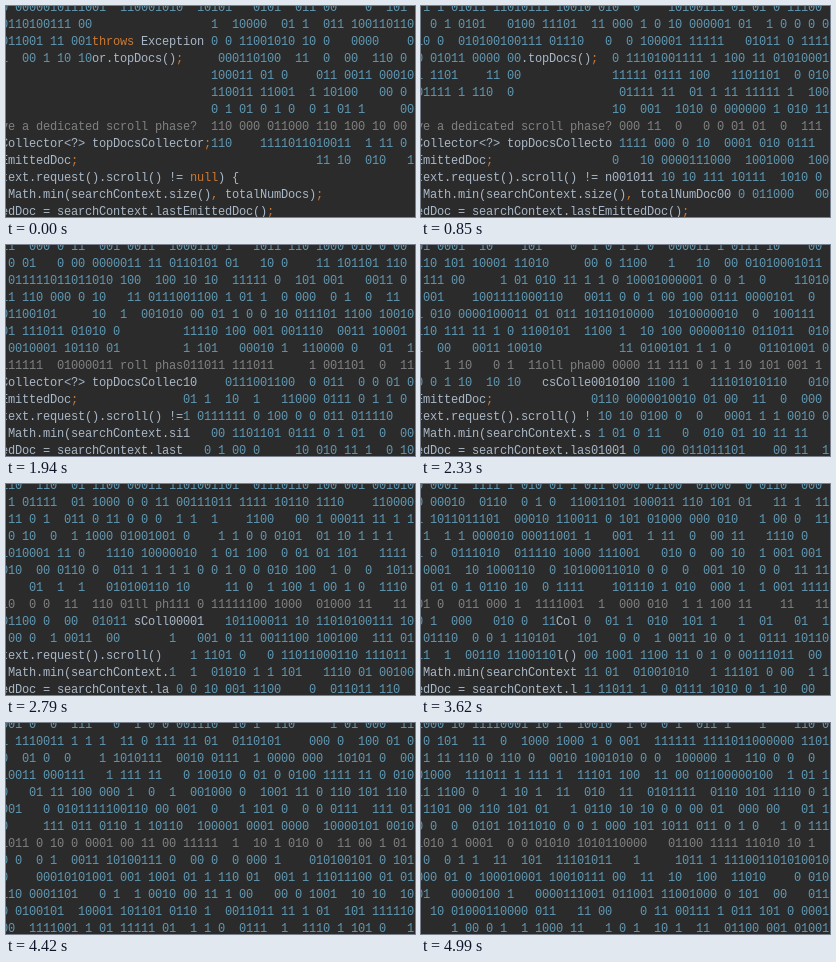
An HTML page for the animation above (5090 ms loop, 409 by 211 pixels).

```html
<!DOCTYPE html>
<html lang="en">
<head>
<meta charset="utf-8">
<title>Code turning into binary</title>
<style>
  html, body { margin: 0; width: 100%; height: 100%; overflow: hidden; background: #2b2b2b; }
  svg { display: block; width: 409px; height: 211px; }
  text {
    font: 12px "Liberation Mono", "DejaVu Sans Mono", monospace;
    white-space: pre;
    fill: #a9b7c6;
  }
  .number { fill: #6098b2; }
  .keyword { fill: #cc7832; }
  .comment { fill: #808080; }
</style>
</head>
<body>
<svg id="editor" viewBox="0 0 409 211"></svg>
<script>
const LOOP = 5090, COLS = 59, CELL = 7, LINE = 17, LEFT = -5, BASE = 5;
const COMMENT_ROW = 7;
const code = [
  '',
  '',
  ' '.repeat(13) + 'throws Exception',
  ' '.repeat(13) + 'or.topDocs();',
  '',
  '',
  '',
  've a dedicated scroll phase?',
  'Collector<?> topDocsCollector;',
  'EmittedDoc;',
  'text.request().scroll() != null) {',
  ' Math.min(searchContext.size(), totalNumDocs);',
  'edDoc = searchContext.lastEmittedDoc();'
].map(line => line.padEnd(COLS));

// moments when the digits are reshuffled
const shuffles = [0, 150, 280, 420, 550, 850, 970, 1240, 1390, 1670, 1820, 1940,
  2090, 2210, 2330, 2480, 2790, 2910, 3190, 3340, 3620, 3770, 3890, 4010,
  4290, 4420, 4690, 4840, 4990];
// moments when the digits spread one row and column further
const spreads = [150, 850, 1240, 1820, 2330, 2790, 3340, 3770, 4290];

const NS = 'http://www.w3.org/2000/svg';
const editor = document.getElementById('editor');
const xs = Array.from({ length: COLS }, (_, c) => LEFT + c * CELL).join(' ');
const rows = code.map((_, r) => {
  const el = document.createElementNS(NS, 'text');
  el.setAttribute('x', xs);
  el.setAttribute('y', BASE + r * LINE);
  return editor.appendChild(el);
});

function seeded(seed) {
  return () => {
    seed = (seed + 0x6d2b79f5) | 0;
    let h = Math.imul(seed ^ (seed >>> 15), seed | 1);
    h ^= h + Math.imul(h ^ (h >>> 7), h | 61);
    return ((h ^ (h >>> 14)) >>> 0) / 4294967296;
  };
}

function covered(depth, row, col) {
  if (row <= depth - 3) return true;
  if (row <= depth && col < depth + 10) return true;
  const front = depth + 6;
  return row <= front && col >= (row === front ? 48 : 33) - depth;
}

function kind(token, row) {
  if (row === COMMENT_ROW) return 'comment';
  if (/^\d/.test(token)) return 'number';
  if (/^(throws|null|[;,])$/.test(token)) return 'keyword';
  return '';
}

function paint(step, depth) {
  const random = seeded(step * 7919 + 17);
  rows.forEach((el, r) => {
    const line = [...code[r]].map((ch, c) => {
      const digit = '01 '[Math.floor(random() * 3)];
      return covered(depth, r, c) ? digit : ch;
    }).join('');
    const tokens = line.match(/\d+|[A-Za-z]\w*|[;,]|[^\w;,]+/g);
    el.replaceChildren(...tokens.map(token => {
      const span = document.createElementNS(NS, 'tspan');
      span.setAttribute('class', kind(token, r));
      span.textContent = token;
      return span;
    }));
  });
}

const passed = (times, t) => times.filter(at => at <= t).length;
const start = performance.now();
let shown = -1;

function tick() {
  const t = (performance.now() - start) % LOOP;
  const step = passed(shuffles, t);
  if (step !== shown) {
    shown = step;
    paint(step, 3 + passed(spreads, t));
  }
  requestAnimationFrame(tick);
}
tick();
</script>
</body>
</html>
```
